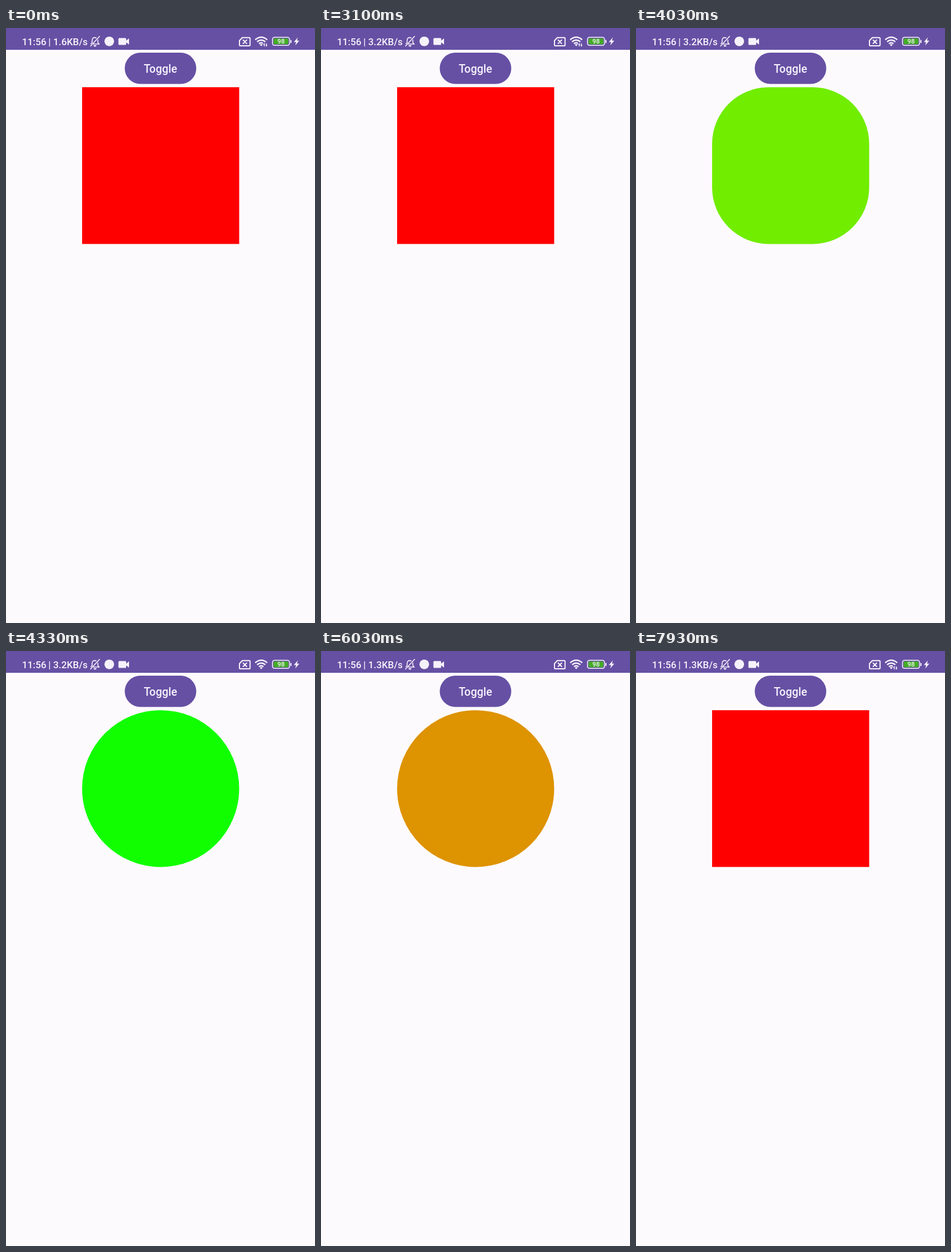
An HTML page that plays this animation: 540x1037 px, repeating every 7960 ms.

```html
<!DOCTYPE html>
<html>
<head>
<meta charset="utf-8">
<style>
html, body { margin: 0; width: 100%; height: 100%; overflow: hidden; background: #fdfafd; }
svg { display: block; width: 540px; height: 1037px; }
text { font-family: Roboto, sans-serif; font-weight: 500; fill: #f6f2fb; }
.line { fill: none; stroke: #f6f2fb; stroke-width: 2; stroke-linecap: round; stroke-linejoin: round; }
.thin { stroke-width: 1.6; }
.wave { stroke-width: 2.4; stroke-linecap: butt; }
.solid { fill: #f6f2fb; }
</style>
</head>
<body>
<svg viewBox="0 0 540 1037">
  <rect width="540" height="1037" fill="#fdfafd"/>
  <rect width="540" height="38" fill="#6650a4"/>

  <g font-size="16.8">
    <text x="28" y="29.5">11:56</text>
    <text x="74" y="29.5">|</text>
    <text id="speed" x="82.5" y="29.5">1.6KB/s</text>
  </g>

  <!-- muted bell -->
  <path class="line thin" d="M153 28H163L160.500 25.500V21M157.500 17.200C153 15.500 150.500 18 150.500 21.500V25.500L148.500 27.500M147.800 31.500L163.500 14.500"/>
  <path class="solid" d="M153 30H158A2.500 2.500 0 0 1 153 30Z"/>
  <circle class="solid" cx="180.500" cy="23.300" r="8.400"/>
  <!-- camera -->
  <path class="solid" d="M198 17.500H208.500Q210 17.500 210 19V22L215 18V29L210 25V28Q210 29.500 208.500 29.500H198Q196.500 29.500 196.500 28V19Q196.500 17.500 198 17.500Z"/>

  <!-- SIM -->
  <path class="line" d="M413 16.800H425Q426.500 16.800 426.500 18.300V29.500Q426.500 31 425 31H409.500Q408 31 408 29.500V22Z"/>
  <path class="line" d="M414.500 21L420.500 27M420.500 21L414.500 27"/>

  <!-- Wi-Fi -->
  <path class="line wave" d="M435.500 20.500Q446 11.500 456.500 20.500M438.800 24Q446 17.800 453.200 24M442 27.300Q446 24 450 27.300"/>
  <path class="solid" d="M443.500 29Q446 27.200 448.500 29L446 31.800Z"/>
  <g id="data">
    <path d="M449 25H458V34H449Z" fill="#6650a4"/>
    <path class="line" style="stroke-width:1.4" d="M451.500 31.500V27.500M450.300 28.800L451.500 27.300M454.800 27.300V31.500M456 30L454.800 31.500"/>
  </g>

  <!-- battery -->
  <rect class="line thin" x="465.700" y="16.300" width="29.800" height="14" rx="3.500"/>
  <rect x="467.700" y="18.300" width="25.800" height="10" rx="1.800" fill="#43ad24"/>
  <rect class="solid" x="497" y="20.800" width="1.900" height="5.400" rx=".8"/>
  <text x="480.700" y="27.400" font-size="11.200" text-anchor="middle">98</text>
  <path class="solid" d="M510 16.500L503 24.500H507L505.500 30.500L512.500 22H508.500Z"/>

  <rect x="207.500" y="43" width="125" height="54.500" rx="27.250" fill="#6650a4"/>
  <text x="270" y="78" font-size="19.300" letter-spacing=".14" text-anchor="middle">Toggle</text>
  <rect id="box" x="133" y="103.200" width="274.500" height="273.200" fill="#f00"/>
</svg>
<script>
const LOOP = 7960, ON = 3413, OFF = 5634;
const WIDTH = 274.5, HEIGHT = 273.2, ROUND = 0.92; // full corner size, as a share of the box
const RED = [0.62796, 0.22486, 0.12585], GREEN = [0.86644, -0.23389, 0.1795]; // Oklab
const get = id => document.getElementById(id);
const box = get('box'), speed = get('speed'), data = get('data');

// cubic-bezier(0.4, 0, 0.2, 1)
function ease(x) {
  if (x <= 0) return 0;
  if (x >= 1) return 1;
  let lo = 0, hi = 1;
  for (let i = 0; i < 30; i++) {
    const s = (lo + hi) / 2, r = 1 - s;
    if (1.2 * r * r * s + 0.6 * r * s * s + s * s * s < x) lo = s; else hi = s;
  }
  return lo * lo * (3 - 2 * lo);
}

function channel(v) {
  v = Math.min(1, Math.max(0, v));
  return Math.round(255 * (v <= 0.0031308 ? 12.92 * v : 1.055 * v ** (1 / 2.4) - 0.055));
}

function mix(p) {
  const [L, a, b] = RED.map((v, i) => v + (GREEN[i] - v) * p);
  const l = (L + 0.39634 * a + 0.2158 * b) ** 3;
  const m = (L - 0.10556 * a - 0.06385 * b) ** 3;
  const s = (L - 0.08948 * a - 1.29149 * b) ** 3;
  const rgb = [
    4.07674 * l - 3.30771 * m + 0.23097 * s,
    -1.26844 * l + 2.60976 * m - 0.34132 * s,
    -0.0042 * l - 0.70342 * m + 1.70761 * s
  ];
  return `rgb(${rgb.map(channel)})`;
}

const toggle = (t, span) => t < OFF ? ease((t - ON) / span) : 1 - ease((t - OFF) / span);

function draw(t) {
  const tint = toggle(t, 1000);
  const corner = Math.min(0.5, ROUND * toggle(t, 2000));
  box.setAttribute('fill', tint <= 0 ? '#f00' : tint >= 1 ? '#0f0' : mix(tint));
  box.setAttribute('rx', WIDTH * corner);
  box.setAttribute('ry', HEIGHT * corner);
  speed.textContent = (t < 2000 ? '1.6' : t < 5000 ? '3.2' : '1.3') + 'KB/s';
  data.style.display = t < 3330 || t >= 6200 ? '' : 'none';
}

const start = performance.now();
function tick() {
  draw((performance.now() - start) % LOOP);
  requestAnimationFrame(tick);
}
draw(0);
requestAnimationFrame(tick);
</script>
</body>
</html>
```
